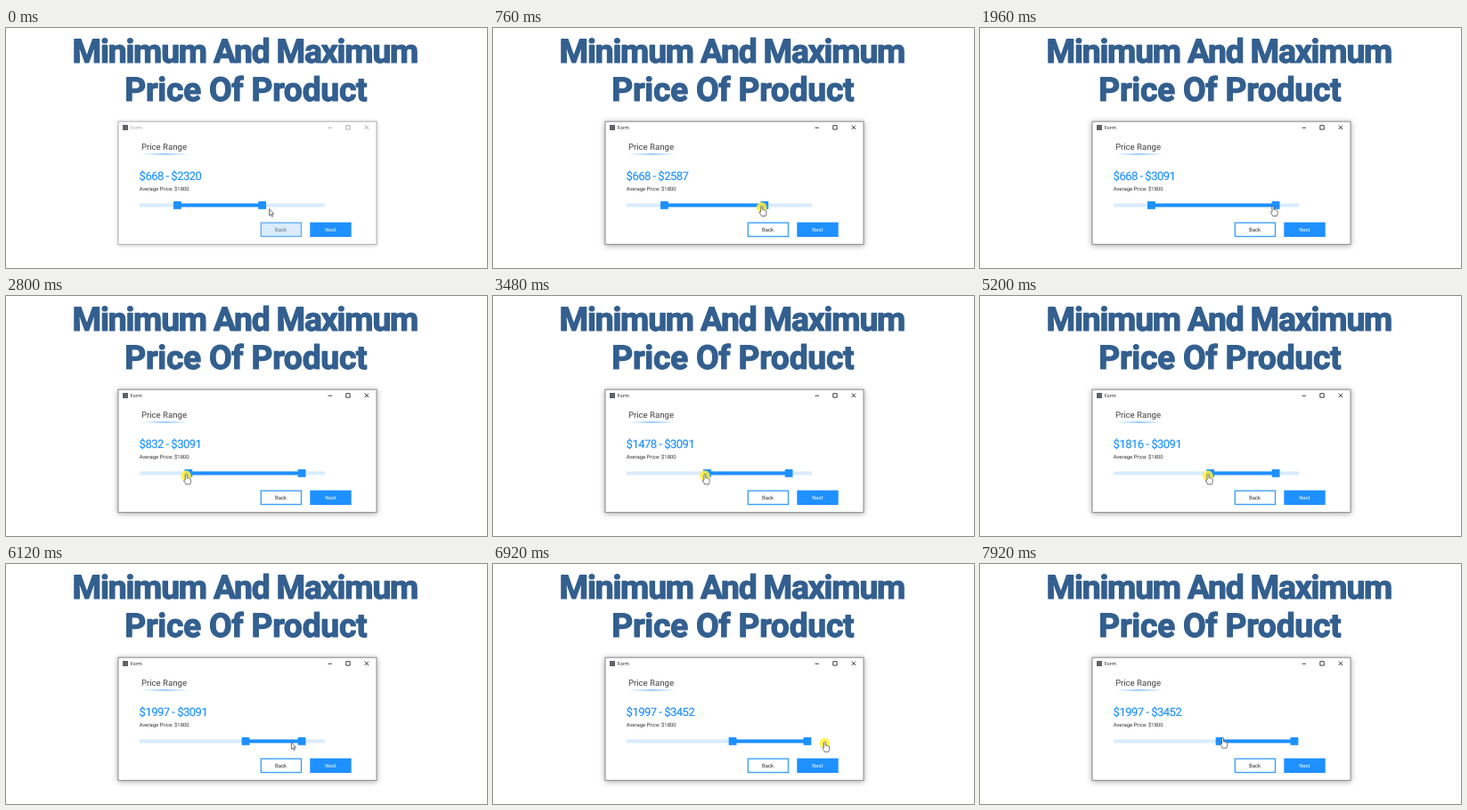
These frames come from a looping animation (540x270 px, 8 s). An HTML page:

```html
<!DOCTYPE html>
<html lang="en">
<head>
<meta charset="utf-8">
<title>Price range slider</title>
<style>
html, body { margin: 0; width: 100%; height: 100%; overflow: hidden; background: #fff; }
svg { display: block; width: 540px; height: 270px; font-family: Roboto, sans-serif; text-rendering: geometricPrecision; }
.title { font-size: 37.2px; font-weight: 700; fill: #335f8f; stroke: #335f8f; stroke-width: 1.2; stroke-linejoin: round; }
.frame { fill: #fff; stroke: #b0b0b0; filter: drop-shadow(0 1px 2px rgba(0, 0, 0, .2)); }
.bar { font: 5.4px "Open Sans", sans-serif; fill: #999; stroke: #999; }
.bar text { stroke: none; }
.bar path { fill: none; stroke-width: .8; }
.range { font-size: 13px; letter-spacing: -.5px; fill: #1e90ff; stroke: #1e90ff; stroke-width: .15; }
.button { font-size: 6px; text-anchor: middle; }
.back { fill: #d9ebfd; stroke: #62b0f5; stroke-width: 1.4; }
.label { fill: #6b7785; }
.active .frame { stroke: #8c8c8c; filter: drop-shadow(0 1px 3px rgba(0, 0, 0, .35)); }
.active .bar { fill: #111; stroke: #111; }
.active .back { fill: #fff; stroke: #3fa0fb; }
.active .label { fill: #333; }
.blue { fill: #1e90ff; }
.pointer { fill: #fff; stroke: #444; stroke-width: .75; stroke-linejoin: round; }
</style>
</head>
<body>
<svg id="stage" viewBox="0 0 540 270">
  <defs>
    <linearGradient id="fade">
      <stop offset="0" stop-color="#1e90ff" stop-opacity="0"/>
      <stop offset=".5" stop-color="#1e90ff" stop-opacity=".75"/>
      <stop offset="1" stop-color="#1e90ff" stop-opacity="0"/>
    </linearGradient>
  </defs>
  <g class="title">
    <text x="74.6" y="38.6" letter-spacing="-1.15">Minimum And Maximum</text>
    <text x="133.2" y="82.2" letter-spacing="-.25">Price Of Product</text>
  </g>

  <rect class="frame" x="126" y="105.2" width="290" height="138.2"/>
  <rect x="131" y="109" width="6" height="6" fill="#5f636a"/>
  <g class="bar">
    <text x="139.6" y="114.1">Form</text>
    <path d="M361.5 112.2h4.5M381.8 109.7h4.4v4.4h-4.4zM402.6 109.6l4.4 4.4m0-4.4l-4.4 4.4"/>
  </g>

  <text x="151.9" y="136.5" font-size="9.65" fill="#444">Price Range</text>
  <rect x="152" y="141.4" width="53" height="1.2" fill="url(#fade)"/>
  <text id="range" class="range" x="149.6" y="170.5"></text>
  <text x="149.8" y="182.8" font-size="5.95" fill="#333">Average Price: $1800</text>

  <rect x="150" y="197.4" width="208" height="4" fill="#d9ebfd"/>
  <rect id="span" class="blue" y="197.4" height="4"/>
  <rect id="low" class="blue" y="195" width="8.8" height="8.8"/>
  <rect id="high" class="blue" y="195" width="8.8" height="8.8"/>

  <g class="button">
    <rect class="back" x="286.3" y="219.1" width="45.2" height="15.4"/>
    <text class="label" x="308.5" y="228.6">Back</text>
    <rect class="blue" x="341.3" y="218.6" width="46.4" height="16.4"/>
    <text x="364.5" y="228.6" fill="#fff">Next</text>
  </g>

  <g id="cursor">
    <circle id="glow" cx=".4" cy="1.8" r="5.8" fill="#fff03a" opacity=".85"/>
    <path id="arrow" class="pointer" d="M0 0V7.6L1.7 6.1 2.9 8.8 4.1 8.2 2.9 5.6H5.1Z"/>
    <path id="hand" class="pointer" d="M-.5 6.8V1Q.5-.4 1.5 1V4.5Q2.4 3.8 3.1 4.8 4 4.2 4.5 5.2 5.7 5 5.7 6.2V8.5Q5.5 10 4.8 11.6H.3Q-.3 10-2.1 7.6-1.9 6.2-.5 6.8Z"/>
  </g>
</svg>
<script>
const LOOP = 8000, TICK = 40, LINGER = 160;
const MAX = 3452, SCALE = .05765;

// Moves either send the pointer to x, y or drag a knob towards a value
const moves = [
  { from: 80, to: 400, x: 284, y: 200 },
  { from: 400, to: 1760, knob: "high", value: 3091, power: 1.585 },
  { from: 1960, to: 2560, x: 189.3, y: 200.3, sag: 11 },
  { from: 2640, to: 5030, knob: "low", value: 1816, power: 3 },
  { from: 5200, to: 5480, knob: "low", value: 1997 },
  { from: 5640, to: 5880, x: 317, y: 201 },
  { from: 6080, to: 6280, x: 334, y: 199.7 },
  { from: 6480, to: 7040, knob: "high", value: 3811, power: 1.6 },
  { from: 7360, to: 7920, x: 272, y: 195.5 },
];

const el = id => document.getElementById(id);
const set = (id, attrs) => Object.entries(attrs).forEach(([k, v]) => el(id).setAttribute(k, v));
const show = (id, on) => set(id, { visibility: on ? "visible" : "hidden" });
const mix = (a, b, f) => a + (b - a) * f;
const toX = value => 153.9 + value * SCALE;

function pose(t) {
  const s = { low: 668, high: 2320, x: 295.6, y: 203.5, held: false };
  for (const { from, to, knob, value, x, y, sag = 0, power = 1 } of moves) {
    if (t < from) break;
    const u = Math.min(1, (t - from) / (to - from));
    const f = 1 - (1 - u) ** power;
    s.held = !!knob && t < to + LINGER;
    if (knob) {
      const v = mix(s[knob], value, f);
      s.x += (v - s[knob]) * SCALE;
      s[knob] = Math.min(v, MAX);
    } else {
      s.x = mix(s.x, x, f);
      s.y = mix(s.y, y, f) + sag * Math.sin(Math.PI * u);
    }
  }
  return s;
}

function draw(t) {
  const { low, high, x, y, held } = pose(t);
  const left = toX(low), right = toX(high);
  set("low", { x: left - 4.4 });
  set("high", { x: right - 4.4 });
  set("span", { x: left, width: right - left });

  // The label trails the knobs by one tick
  const label = pose(t - TICK);
  el("range").textContent = `$${Math.round(label.low)} - $${Math.round(label.high)}`;

  const over = y < 203 && [left, right].some(k => Math.abs(x - k) < 6);
  set("cursor", { transform: `translate(${x} ${y})` });
  show("glow", held);
  show("hand", held || over);
  show("arrow", !held && !over);
  el("stage").classList.toggle("active", t >= moves[1].from);
}

const start = performance.now();
function frame() {
  const t = (performance.now() - start) % LOOP;
  draw(Math.floor(t / TICK) * TICK);
  requestAnimationFrame(frame);
}
frame();
</script>
</body>
</html>
```
